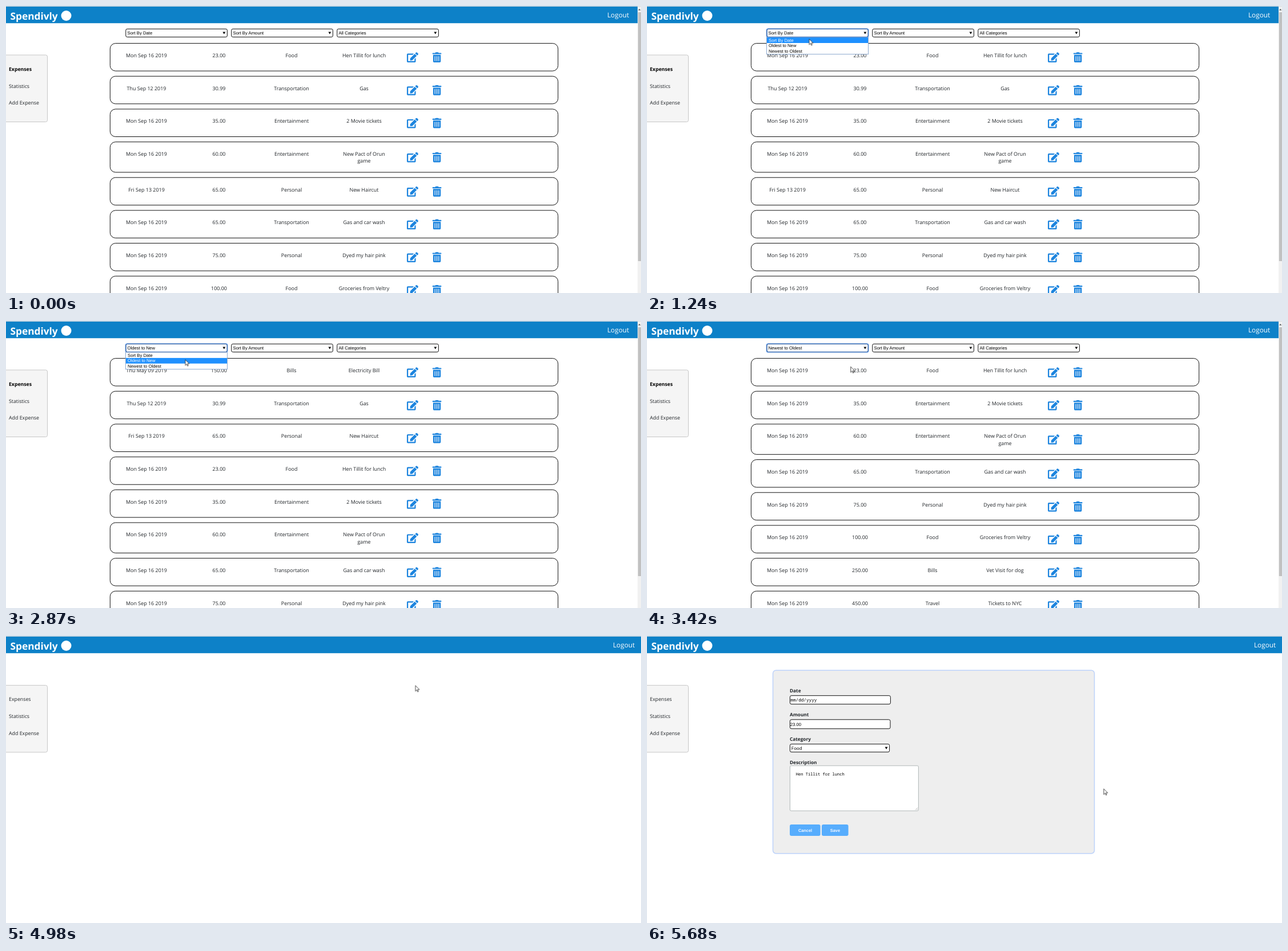
Write an HTML page that moves like this. It is 1112 by 504 pixels and loops after 5760 ms.

```html
<!DOCTYPE html>
<html lang="en">
<head>
<meta charset="utf-8">
<title>Expense list</title>
<style>
html, body { margin: 0; width: 100%; height: 100%; overflow: hidden; background: #fff; }
svg { display: block; width: 1112px; height: 504px; text-rendering: geometricPrecision; }
text { font: 8.95px "Open Sans", "Noto Sans", sans-serif; fill: #212529; }
.nav { font-size: 8.8px; }
.on { font-weight: 700; fill: #000; font-size: 8.7px; }
.brand { font-size: 17.3px; font-weight: 700; fill: #fff; }
.logout { font-size: 11.75px; fill: #fff; }
.label { font-size: 8.25px; font-weight: 700; }
.mid { text-anchor: middle; }
.ui { font: 7.72px "Liberation Sans", Arial, sans-serif; fill: #000; }
.hot { fill: #fff; }
.mono { font: 7.1px "Noto Sans Mono", monospace; fill: #000; }
.wide { font-size: 7.7px; }
.btn { font: 700 7.4px "Liberation Sans", Arial, sans-serif; fill: #f4f8ff; text-anchor: middle; }
.box { fill: #fff; stroke: #111; }
.icon { fill: #1c84de; }
</style>
</head>
<body>
<svg id="stage" viewBox="0 0 1112 504" xmlns="http://www.w3.org/2000/svg">
  <defs>
    <g id="edit" class="icon" transform="scale(.0347) translate(-288 -256)">
      <path d="M384 346V448H64V128H294L350 64H48Q0 64 0 112V464Q0 512 48 512H400Q448 512 448 464V285Z"/>
      <path d="M171 302L396 77 499 180 274 406 182 416Q158 418 160 394Z"/>
      <path d="M418 54L460 12Q488 -10 516 12L565 61Q587 88 565 116L523 158Z"/>
    </g>
    <g id="trash" class="icon" transform="scale(.0347) translate(-224 -256)">
      <path d="M32 128H416V464Q416 512 368 512H80Q32 512 32 464Z"/>
      <path d="M16 32H136L146 13Q153 0 167 0H281Q296 0 303 13L312 32H432Q448 32 448 48V80Q448 96 432 96H16Q0 96 0 80V48Q0 32 16 32Z"/>
      <path d="M128 208V432M224 208V432M320 208V432" stroke="#fff" stroke-width="34" stroke-linecap="round"/>
    </g>
    <path id="arrow" d="M0 0V17L4 13.2 6.6 19 9 18 6.5 12.2H12Z" transform="scale(.58)" fill="#fff" stroke="#111" stroke-width="1.3"/>
    <path id="hand" d="M5 1.5Q6.500 0 8 1.500V8Q9.500 7 11 8.500 12.500 7.500 14 9.200 16 8.500 16.500 10.500V16Q16 19 14.500 21V23H6.500V21L1 14.500Q.5 12 2.500 12.200L5 14.500Z" transform="translate(-2.500 0) scale(.58)" fill="#fff" stroke="#111" stroke-width="1.4"/>
  </defs>
</svg>
<script>
const LOOP = 5760;
const stage = document.getElementById('stage');
const rules = [];

const pct = t => Math.max(0, t / LOOP * 100 - (t < LOOP ? .005 : 0)).toFixed(3) + '%';

function animate(frames) {
  const name = 'a' + rules.length;
  rules.push(`@keyframes ${name}{${frames}}`);
  return `style="animation:${name} ${LOOP}ms step-end infinite"`;
}

// Shows the markup only between two times.
function during(from, to, markup) {
  const start = from ? '0%{opacity:0}' : '';
  return `<g ${animate(`${start}${pct(from)}{opacity:1}${pct(to)}{opacity:0}`)}>${markup}</g>`;
}

const text = (x, y, s, cls = '') => `<text x="${x}" y="${y}" class="${cls}">${s}</text>`;
const rect = (x, y, w, h, r, attrs) =>
  `<rect x="${x}" y="${y}" width="${w}" height="${h}" rx="${r}" ${attrs}/>`;
const caret = (x, y) => `<path d="M${x - 2.4} ${y - 2}h4.800l-2.400 4.200z"/>`;
const select = (x, y, w, h) => rect(x, y, w, h, 2.5, 'class="box"') + caret(x + w - 5.5, y + h / 2);

const day = 'Mon Sep 16 2019';
const expenses = [
  [day, '23.00', 'Food', 'Hen Tillit for lunch'],
  ['Thu Sep 12 2019', '30.99', 'Transportation', 'Gas'],
  [day, '35.00', 'Entertainment', '2 Movie tickets'],
  [day, '60.00', 'Entertainment', 'New Pact of Orun', 'game'],
  ['Fri Sep 13 2019', '65.00', 'Personal', 'New Haircut'],
  [day, '65.00', 'Transportation', 'Gas and car wash'],
  [day, '75.00', 'Personal', 'Dyed my hair pink'],
  [day, '100.00', 'Food', 'Groceries from Veltry'],
  ['Thu May 09 2019', '150.00', 'Bills', 'Electricity Bill'],
  [day, '250.00', 'Bills', 'Vet Visit for dog'],
  [day, '450.00', 'Travel', 'Tickets to NYC']
];

function card(row, top) {
  const h = row[4] ? 53.3 : 48.5;
  const cells = row.slice(0, 4).map((s, i) => text(246 + 127 * i, top + 24.3, s, 'mid')).join('');
  const extra = row[4] ? text(627, top + 36.7, row[4], 'mid') : '';
  const icons = [['edit', 712], ['trash', 754.6]]
    .map(([id, x]) => `<use href="#${id}" x="0" y="0" transform="translate(${x} ${top + h / 2 + .3})"/>`).join('');
  return rect(182.3, top, 784.4, h, 9.5, 'class="box"') + cells + extra + icons;
}

function list(order, sort) {
  let top = 65.6;
  return order.map(i => {
    const markup = card(expenses[i], top);
    top += expenses[i][4] ? 62.5 : 57.7;
    return markup;
  }).join('') + text(212.5, 50, sort, 'ui');
}

const sorts = ['Sort By Date', 'Oldest to New', 'Newest to Oldest'];
const menu = hot => rect(209.5, 55, 178, 29.7, 0, 'fill="#fff" stroke="#7f9fc9" stroke-width=".9"') +
  rect(210, 55.2 + hot * 9.7, 177, 9.8, 0, 'fill="#1e90ff"') +
  sorts.map((s, i) => text(213, 62.6 + i * 9.75, s, i === hot ? 'ui hot' : 'ui')).join('');

const nav = (y, first) => rect(-4, y, 76.5, 117.5, 3, 'fill="#f5f5f5" stroke="#c6c6c6"') +
  ['Expenses', 'Statistics', 'Add Expense']
    .map((s, i) => text(5, y + 27.8 + i * 29.7, s, i ? 'nav' : 'nav ' + first)).join('');

const header = rect(0, 0, 1112, 1, 0, 'fill="#d8dcdf"') +
  rect(0, 1, 1112, 29.2, 0, 'fill="#0d81c8"') +
  text(7.5, 23.6, 'Spendivly', 'brand') + '<circle cx="105.500" cy="17" r="9" fill="#fff"/>';

const listPage = text(1053, 19.7, 'Logout', 'logout') + nav(86, 'on') +
  rect(1106, 1, 6, 503, 0, 'fill="#f1f1f1"') + rect(1106.8, 11, 5.2, 437, 0, 'fill="#c1c1c1"') +
  '<path d="M1107 7.500h4.400l-2.200-2.500z" fill="#505050"/>' +
  [209.8, 394.8, 579.8].map(x => select(x, 40.3, 177.6, 14.2)).join('') +
  text(397.5, 50, 'Sort By Amount', 'ui') + text(582.5, 50, 'All Categories', 'ui');

const focus = rect(209.6, 40.1, 178, 14.6, 2.5, 'fill="none" stroke="#6aa5f5" stroke-width="1.800"') +
  rect(209.9, 40.4, 177.4, 14, 2.5, 'fill="none" stroke="#1d3f73" stroke-width=".7"');

const form = rect(220.5, 60.2, 563, 321.8, 5.5, 'fill="#eee" stroke="#bcd2fa" stroke-width="1.500"') +
  text(250, 99.2, 'Date', 'label') + rect(250.4, 104.7, 176, 15, 2.5, 'class="box"') +
  text(251.3, 115, 'mm/dd/yyyy', 'mono wide') +
  text(250, 141.2, 'Amount', 'label') + rect(250.4, 146.8, 175.6, 16, 2.5, 'class="box"') +
  text(250.8, 157.7, '23.00', 'ui') +
  text(250, 184.4, 'Category', 'label') + select(250.4, 189.8, 174.2, 14) +
  text(252.8, 199.5, 'Food', 'mono wide') +
  text(250, 225.2, 'Description', 'label') +
  rect(250.4, 227.8, 225, 79.2, 2, 'fill="#fff" stroke="#a9b0b0" stroke-width=".9"') +
  '<path d="M470 305.500l4-4M472.500 305.500l1.500-1.500" stroke="#888" stroke-width=".6"/>' +
  text(260.7, 244.8, 'Hen Tillit for lunch', 'mono') +
  rect(250, 331, 53.6, 20, 3, 'fill="#57adfd"') + text(277, 343.6, 'Cancel', 'btn') +
  rect(306, 331, 46.6, 20, 3, 'fill="#57adfd"') + text(329.4, 343.6, 'Save', 'btn');

// Time, position, and how many jumps lead to the next position.
const path = [
  [0, 1160, 560], [130, 1160, 560, 8], [760, 262, 32, 3], [1000, 282, 46],
  [1160, 282, 46, 2], [1235, 284, 58], [1310, 289, 73], [1390, 289, 69],
  [1620, 284, 67], [1780, 289, 73], [2090, 289, 73, 8], [2720, 316, 38, 2],
  [2870, 314, 68], [3030, 314, 77], [3420, 314, 77, 8], [4050, 656, 103, 4],
  [4360, 708, 80], [4440, 717, 87], [5300, 717, 87, 6], [LOOP, 816.5, 304.7]
];
const pointer = path.map(([t, x, y, n]) =>
  `${pct(t)}{transform:translate(${x}px,${y}px);animation-timing-function:${n ? `steps(${n},start)` : 'step-end'}}`).join('');

const markup = header +
  during(0, 4820, listPage) +
  during(0, 1780, list([0, 1, 2, 3, 4, 5, 6, 7], sorts[0])) +
  during(1780, 3180, list([8, 1, 4, 0, 2, 3, 5, 6], sorts[1])) +
  during(3180, 4820, list([0, 2, 3, 5, 6, 7, 9, 10], sorts[2])) +
  during(1080, 4820, focus) +
  during(1080, 1310, menu(0)) + during(1310, 1780, menu(1)) +
  during(2490, 3030, menu(1)) + during(3030, 3180, menu(2)) +
  during(4820, LOOP, text(1063, 19.7, 'Logout', 'logout') + nav(86.6, '')) +
  during(5060, LOOP, form) +
  `<g ${animate(pointer)}>` +
  during(0, 4360, '<use href="#arrow"/>') +
  during(4360, 4980, '<use href="#hand"/>') +
  during(4980, LOOP, '<use href="#arrow"/>') + '</g>';

document.head.appendChild(document.createElement('style')).textContent = rules.join('\n');
stage.insertAdjacentHTML('beforeend', markup);
</script>
</body>
</html>
```
